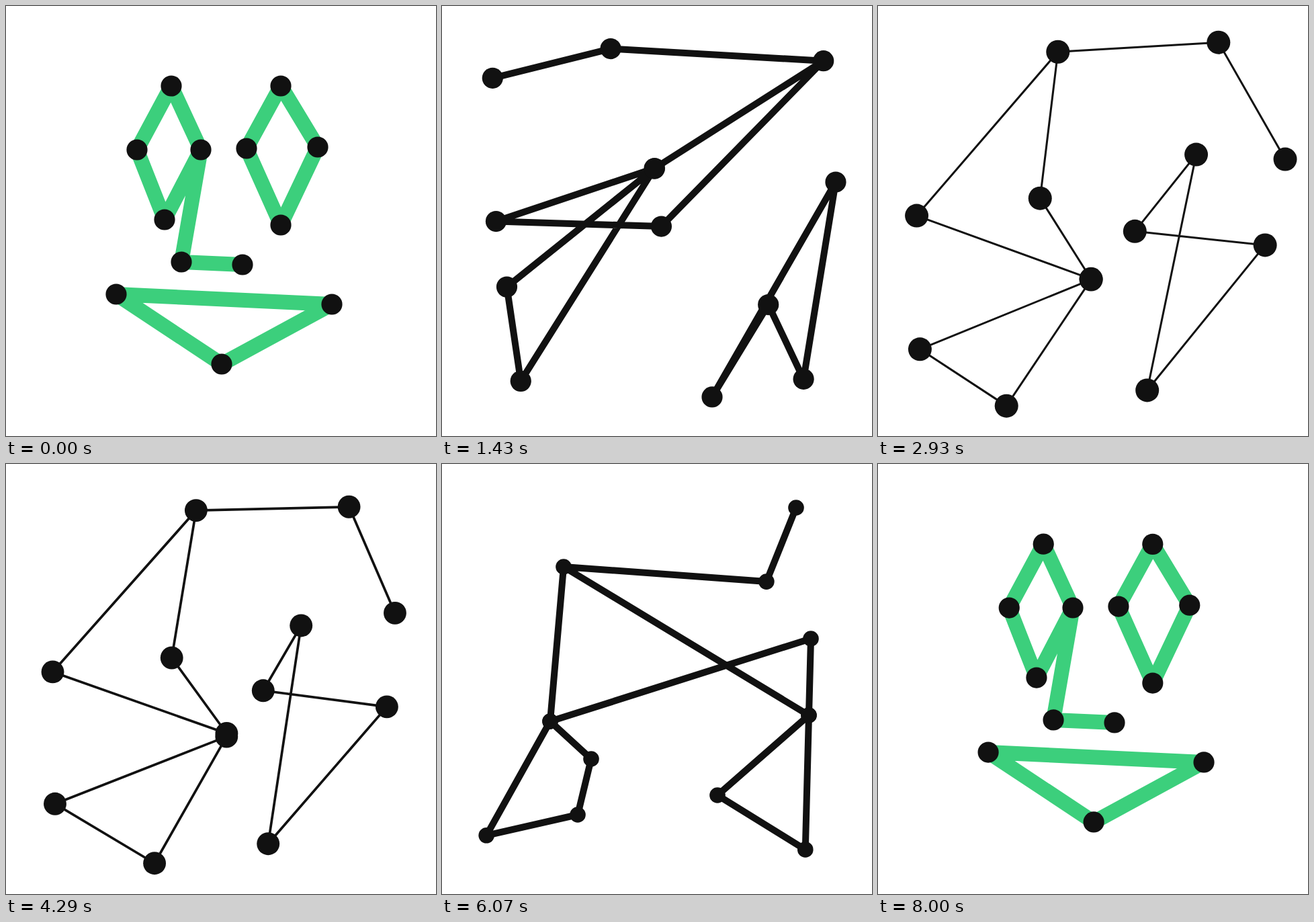
An HTML page for the animation above (8070 ms loop, 640x640 px).

```html
<!DOCTYPE html>
<html lang="en">
<head>
<meta charset="utf-8">
<title>Dots and lines</title>
<style>
  html, body { margin: 0; width: 100%; height: 100%; overflow: hidden; background: #fff; }
  svg { display: block; width: 100%; height: 100%; }
  path { fill: none; stroke-linejoin: round; }
  circle { fill: #111; }
</style>
</head>
<body>
<svg id="stage" viewBox="0 0 640 640"><path id="lines"/></svg>
<script>
const LOOP = 8070, PHASE = 2000, FRAME = 1000 / 14, LAST = 112;
const STAGGER = 50, PEAK = 745, OVERSHOOT = .058;
const INK = [17, 17, 17], GREEN = [60, 207, 124];

// Two four-sided loops, a tail and a triangle, as point indices.
const paths = [[0, 1, 2, 7, 0], [4, 3, 6, 8, 4], [4, 5, 9], [10, 11, 12, 10]];

// Where the points rest; a single number shares the place of that point.
const poses = [
  { width: 22, radius: 15.6, color: GREEN, points: [
    [358, 212], [409, 326], [464, 210], [246, 119], [290, 214], [261, 381], [195, 214],
    [409, 119], [236, 318], [352, 385], [164, 429], [485, 444], [321, 533]] },
  { width: 10, radius: 15.6, color: INK, points: [
    [539, 557], [486, 445], [402, 582], [326, 327], [565, 83], [251, 62], [80, 321],
    [586, 262], [316, 242], [78, 110], [117, 559], [95, 418], 8] },
  { width: 3, radius: 17.5, color: INK, points: [
    [472, 213], [400, 573], [573, 360], [245, 288], [283, 69], [513, 54], [319, 407],
    [386, 334], [69, 309], [579, 222], [193, 596], 6, [67, 506]] },
  { width: 10, radius: 11.8, color: INK, points: [
    [66, 553], 8, [222, 439], [546, 374], [181, 153], [483, 175], [549, 260],
    [202, 522], [161, 383], [527, 65], [541, 574], 3, [410, 493]] }
];

const mix = (a, b, k) => a + (b - a) * k;
const place = (pose, i) => {
  const p = pose.points[i];
  return Array.isArray(p) ? p : pose.points[p];
};

// Eased rise past the goal, then a damped wobble around it.
function spring(t) {
  if (t <= 0) return 0;
  if (t < PEAK) return (1 + OVERSHOOT) * (1 - Math.cos(Math.PI * (t / PEAK) ** 1.8)) / 2;
  const s = (t - PEAK) / 1000;
  return 1 + OVERSHOOT * Math.exp(-3.6 * s) * Math.cos(13.5 * s);
}

function cubic(x) {
  if (x >= 1) return 1;
  return x < .5 ? 4 * x ** 3 : 1 - 4 * (1 - x) ** 3;
}

const stage = document.getElementById('stage');
const lines = document.getElementById('lines');
const dots = poses[0].points.map(() => stage.appendChild(
  document.createElementNS('http://www.w3.org/2000/svg', 'circle')));

function draw(time) {
  const now = Math.min(LAST, Math.floor((time % LOOP + 5) / FRAME)) * FRAME;
  const step = Math.min(3, Math.floor(now / PHASE + 1e-6));
  const from = poses[step], to = poses[(step + 1) % 4];
  const t = now - step * PHASE;

  const at = dots.map((_, i) => {
    const k = spring(t - i % 5 * STAGGER), end = place(to, i);
    return place(from, i).map((v, axis) => mix(v, end[axis], k));
  });
  const k = cubic(t / 980);
  const color = from.color.map((v, i) => Math.round(mix(v, to.color[i], k)));

  lines.setAttribute('d', paths.map(p => 'M' + p.map(i => at[i]).join('L')).join(''));
  lines.setAttribute('stroke', `rgb(${color})`);
  lines.setAttribute('stroke-width', mix(from.width, to.width, k));
  dots.forEach((dot, i) => {
    dot.setAttribute('cx', at[i][0]);
    dot.setAttribute('cy', at[i][1]);
    dot.setAttribute('r', mix(from.radius, to.radius, k));
  });
}

const start = performance.now();
function tick() {
  draw(performance.now() - start);
  requestAnimationFrame(tick);
}
tick();
</script>
</body>
</html>
```
